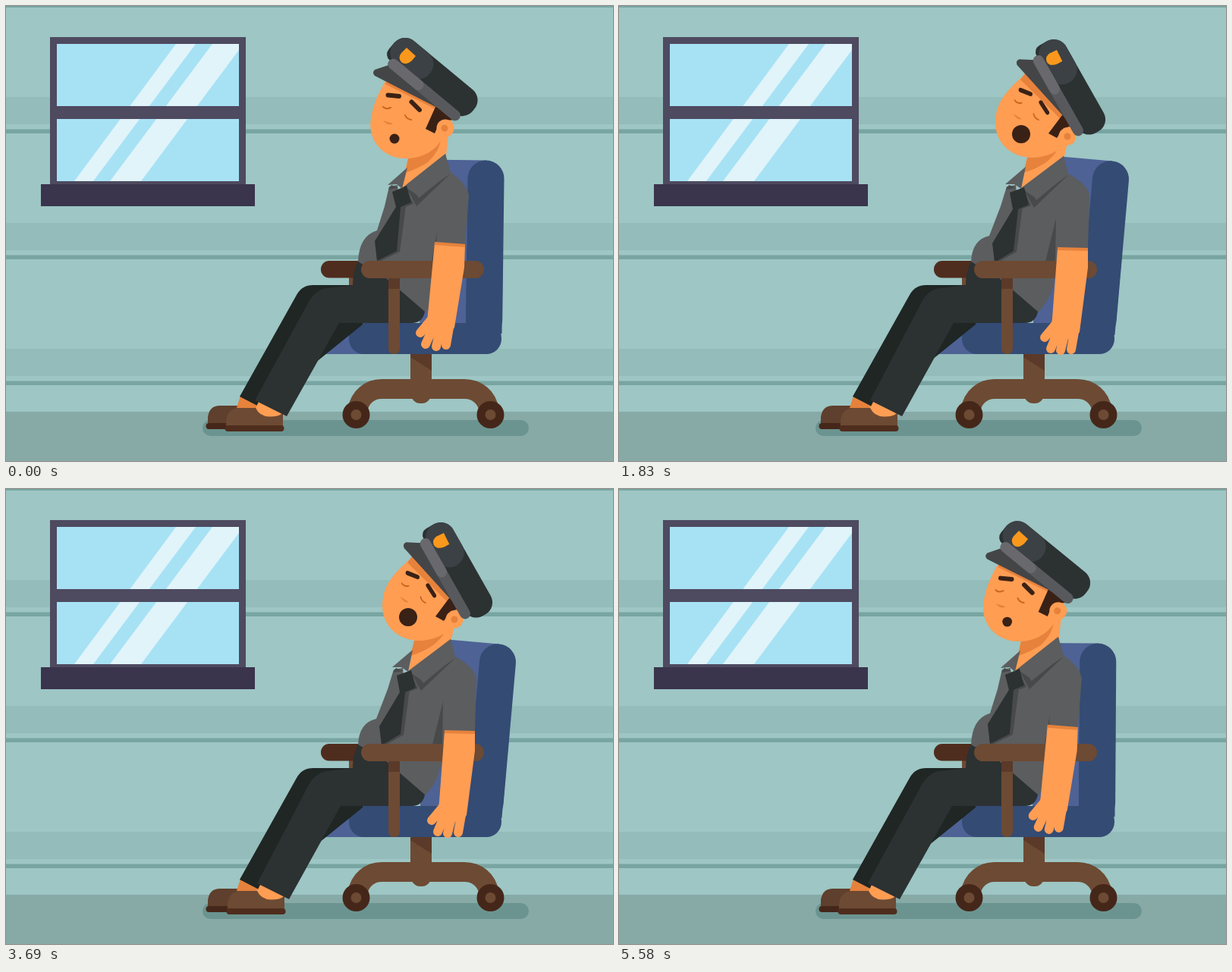
An HTML page with a canvas that plays this animation: 800 by 600 pixels, repeating every 5610 ms.

```html
<!DOCTYPE html>
<html lang="en">
<head>
<meta charset="utf-8">
<title>Sleeping guard</title>
<style>
html, body { margin: 0; width: 100%; height: 100%; overflow: hidden; background: #9dc6c4; }
canvas { display: block; }
</style>
</head>
<body>
<canvas id="stage" width="800" height="600"></canvas>
<script>
const ctx = document.getElementById('stage').getContext('2d');
const LOOP = 5610, BREATHS = LOOP / 2, STEP = 30;

const skin = '#ff9d53', blush = '#e6823c', hair = '#3a2115', shirt = '#5c5d5f', fold = '#48494b',
  cloth = '#2c3132', wood = '#6d4a33', woodShade = '#5b3a29', woodDark = '#45271a',
  blue = '#344b74', blueLight = '#4e6295', line = '#78a5a2';

// [phase in ms, value] over two breaths
const headKeys = [[0, 0], [195, .07], [400, .48], [570, .93], [780, 1.1], [885, 1], [1140, .35],
  [1300, .12], [1485, .27], [1710, .8], [1830, 1], [2000, 1.1], [2150, 1.07], [2280, .82],
  [2325, .62], [2500, .07], [2775, -.02]];
const backKeys = [[0, .14], [90, .12], [195, 0], [400, .56], [570, 1], [690, 1.08], [780, 1.1], [885, 1],
  [1140, .32], [1300, .12], [1485, .39], [1710, .83], [1830, 1], [2000, 1.12], [2150, 1.05],
  [2280, .66], [2325, .42], [2500, -.04], [2775, .07]];

// Smooth periodic curve through the keys
function curve(keys, t) {
  const n = keys.length;
  const key = i => {
    const turn = Math.floor(i / n), [time, value] = keys[i - turn * n];
    return [time + turn * BREATHS, value];
  };
  const slope = i => {
    const [a, u] = key(i - 1), [, v] = key(i), [b, w] = key(i + 1);
    return (v - u) * (w - v) <= 0 ? 0 : (w - u) / (b - a);
  };
  let i = 0;
  while (key(i + 1)[0] <= t) i++;
  const [t0, v0] = key(i), [t1, v1] = key(i + 1);
  const d = t1 - t0, s = (t - t0) / d, r = 1 - s;
  return v0 * (1 + 2 * s) * r * r + v1 * s * s * (3 - 2 * s)
    + d * s * r * (slope(i) * r - slope(i + 1) * s);
}

// In path text "a~b" blends from the upright pose to the leaning one
let lean = 0;
const mix = (a, b) => a + (b - a) * lean;
const path = d => new Path2D(d.replace(/([\d.]+)~([\d.]+)/g, (_, a, b) => mix(+a, +b)));

function fill(color, d) {
  ctx.fillStyle = color;
  ctx.fill(path(d));
}
function stroke(color, width, d) {
  ctx.strokeStyle = color;
  ctx.lineWidth = width;
  ctx.stroke(path(d));
}
function box(color, x, y, w, h, r = 0) {
  ctx.fillStyle = color;
  ctx.beginPath();
  ctx.roundRect(x, y, w, h, r);
  ctx.fill();
}
function disc(color, x, y, r) {
  ctx.fillStyle = color;
  ctx.beginPath();
  ctx.arc(x, y, r, 0, 7);
  ctx.fill();
}
function group(draw) {
  ctx.save();
  draw();
  ctx.restore();
}
function turn(deg, x, y) {
  ctx.translate(x, y);
  ctx.rotate(deg * Math.PI / 180);
  ctx.translate(-x, -y);
}

function room() {
  box('#9dc6c4', 0, 0, 800, 600);
  for (const y of [-46, 120, 286, 452]) {
    box('#93bcba', 0, y, 800, 36);
    box(line, 0, y + 42.5, 800, 5.5);
  }
  box('#87aaa7', 0, 535, 800, 65);

  box('#4e4a60', 58, 41, 258, 196);
  box('#a7e2f4', 67, 50, 240, 181);
  fill('#e0f4fa', 'M224 50H250L115 231H90Z M272 50H307V58L178 231H137Z');
  box('#4e4a60', 67, 132, 240, 17);
  box('#3a344d', 46, 235, 282, 29);
  box('#6b9490', 259, 546, 430, 21, 10.5);
}

function chairBase() {
  box(wood, 533, 455, 28, 45);
  fill(woodShade, 'M533 459H561V481L533 463Z');
  ctx.lineCap = 'butt';
  stroke(wood, 26, 'M463 534C466 515 480 505 495 505H604C620 505 634 515 637 534');
  ctx.lineCap = 'round';
  box(wood, 534, 500, 26, 24, 12);
  for (const x of [461.5, 638.5]) {
    disc(woodDark, x, 539, 18);
    disc(wood, x, 539, 7);
  }
}

function chairSeat(back) {
  box(wood, 452, 350, 10, 30);
  box('#4f2d1e', 415, 336, 70, 22.5, 11);
  group(() => {
    turn(5.05 * back, 630, 432);
    box(blueLight, 545, 203.5, 85, 226);
    box(blue, 606, 203.5, 48, 234, 24);
    box(blue, 606, 320, 47.5, 112);
  });
  box(blueLight, 405, 418, 90, 41, 8);
  box(blue, 452, 418, 201, 41, 20);
}

function legs() {
  const slide = Math.max(0, mix(0, 2));
  // far foot and leg
  fill('#5f3f2d', 'M266 551V542Q268 527 282 527H310V551Z');
  box(woodDark, 263.5, 550, 40, 8, 4);
  fill(blush, 'M309 514L334 527L328 531L304 530Z');
  fill('#1f2624', 'M308 515L383 381Q390 368 405 368H470V420L335 529Z');
  // near foot
  group(() => {
    ctx.translate(slide, 0);
    fill(wood, 'M290 554V547Q292 530 308 530H330Q336 541 347 541Q360 542 365 533V554Z');
    box('#4f2d1e', 288.5, 553, 78, 8, 4);
    fill(skin, 'M334 520L364 537Q360 541.5 347 541.5Q334 541 329 530Z');
  });
}

function trousers() {
  fill(cloth, 'M328~331 520L399 390Q409 372 427 371.5L457 368Q457 349 464 337L500 358L552 403Q549 418 535 418H439~441L370~373 541Z');
}

function torso() {
  // neck
  fill(skin, 'M532~541 190L521~530 242L545 235L580~587 198L584~593 160~172Z');
  fill(blush, 'M530~538 201~200Q563~571 199 573~580 168~181Q575~580 188~192 556~563 206Q542~550 215 526~533 220Z');
  // shirt
  fill(shirt, 'M505~511 238L499~503 264L489~488 296~303Q465 303~308 464 338L500 367L551 405Q572~574 385 576~577 340L570~580 314~319L605~618 315~320L610~620 250Q608~618 235 586~592 219~221L579~586 195~198L522~530 240L517~524 246L516~523 236Z');
  fill(fold, 'M568~576 298~280L561~562 337L566~575 337Z');
  fill(fold, 'M508~514 236L504~510 242L517~523 240Z');
  fill(fold, 'M528~534 240~243L541~547 264~266L586~592 221~223L543~549 250~253Z');
  // tie and its shadow
  fill(fold, 'M519~525 264L527~532 264L519~524 324L490~496 338~340L488~495 330Z');
  fill(fold, 'M526~532 240L537~543 261~263L520~526 267~269Z');
  fill(cloth, 'M509~515 245~246L528~534 237~239L534~540 259~262L520~526 265~268L515~520 323L489~495 336~338L486~492 310~313L514~519 265~268Z');
  // collar
  fill(shirt, 'M503~509 236~235L529~536 213~212L522~530 241L515~521 235Z');
  fill(shirt, 'M579~586 195~198L585~591 220~222L544~550 253~256L530~537 234~236Z');
}

function head() {
  fill(skin, 'M500~538 99~88Q484~500 126~118 481~497 148~143C476~491 178~175 498~513 201~199 526~543 201~200C550~563 201~200 568~580 190~192 577~588 171~181L588~598 148~158Z');
  fill(blush, 'M502~538 97~85L500~529 103~97L566~584 136~151L577~594 132~140Z');
  fill(hair, 'M566~584 133~144L553~566 162~168L565~577 168~174L572~586 152~161L590~598 150~158V142~148Z');
  disc(skin, mix(579, 591), mix(161, 172), 11.5);
  disc(blush, mix(578, 591), mix(161, 172), 4.5);

  // brows, eyes and nose turn and foreshorten together
  group(() => {
    ctx.translate(mix(512, 530), mix(175, 169));
    ctx.transform(mix(1, .9), mix(0, .252), mix(0, -.123), mix(1, .974), 0, 0);
    ctx.translate(-512, -175);
    stroke(hair, 6, 'M503.5 117.5L518 119 M534.5 126.5L545 137');
    stroke('#c9651f', 2, 'M497 133Q501 137 507 134 M526 144Q528 149 534 150');
    fill(blush, 'M497 151L510 155Q504 159 497 151Z');
  });
  disc('#3a2115', mix(512, 530), mix(175, 169), mix(6.5, 12));
}

function hat() {
  group(() => {
    turn(mix(0, 20.8), 544, 190);
    fill('#444547', 'M486 84L507 77L592 146L576 138L486 92Q482 88 486 84Z');
    group(() => {
      ctx.translate(526, 61);
      ctx.rotate(.693);
      box(cloth, -19, -19, 137, 40, [19, 18, 18, 10]);
      box('#3c4145', -19, -19, 62, 39, 19);
      box('#58595d', -9, 15, 120, 14, 7);
      box('#68686d', -9, 15, 57, 14, 7);
    });
    fill('#f9981d', 'M528 55L540 66L535 72Q527 79 521 74Q516 68 521 62Z');
  });
}

function armrest() {
  box(wood, 504, 350, 15, 109, 7);
  box(woodShade, 504, 358, 15, 15);
  box(wood, 468, 336, 162, 23, 11.5);
}

function arm() {
  fill(skin, 'M565~578 312~319L605~618 316~320L604~618 345L591~607 424~430L584~600 434~440L553~568 428~435L556~571 406~412Z');
  stroke(skin, 12, 'M561~576 413~419L546~561 431~437 M563~578 424~430L553~569 446~452 M573~588 424~430L567~582 449~454 M584~600 424~430L580~596 447~453');
  ctx.lineCap = 'butt';
  stroke(blush, 4, 'M565~578 313~320L605~618 316~321');
  ctx.lineCap = 'round';
}

function draw(t) {
  const phase = t % BREATHS;
  const jolt = Math.exp(-(((t - 780) / 60) ** 2));
  const rock = () => turn(jolt, 547, 459);
  lean = curve(headKeys, phase) + .1 * jolt;
  ctx.lineCap = 'round';

  room();
  chairBase();
  group(() => {
    rock();
    chairSeat(curve(backKeys, phase));
  });
  legs();
  torso();
  trousers();
  // tie tip and belly stay above the belt line
  head();
  hat();
  group(() => {
    rock();
    armrest();
  });
  arm();
}

function frame() {
  const t = performance.now() % LOOP;
  draw(t - t % STEP);
  requestAnimationFrame(frame);
}
frame();
</script>
</body>
</html>
```
